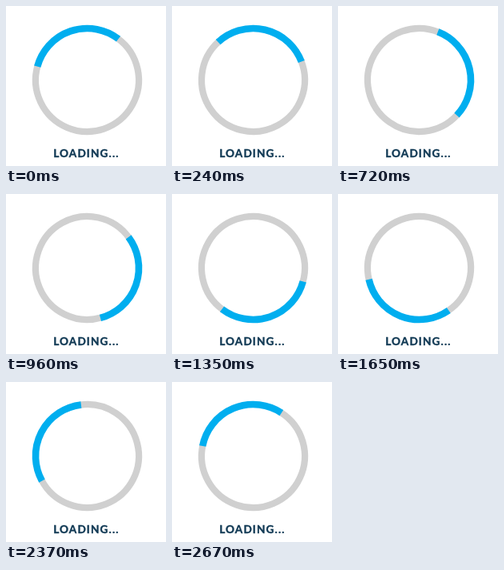
An HTML page that plays this animation: 200x200 px, repeating every 2700 ms.

```html
<!DOCTYPE html>
<html lang="en">
<head>
<meta charset="utf-8">
<title>Loading</title>
<style>
  html, body { margin: 0; width: 100%; height: 100%; overflow: hidden; background: #fff; }
  svg { display: block; width: 100vw; height: 100vh; }
  text {
    font: 700 13.6px Lato, "Open Sans", sans-serif;
    letter-spacing: 1.12px;
    fill: #123a55;
    stroke: #123a55;
    stroke-width: .4px;
  }
</style>
</head>
<body>
<svg viewBox="0 0 200 200">
  <g fill="none">
    <path id="track" stroke="#d0d0d0" stroke-width="8.2"/>
    <path id="arc" stroke="#00aeef" stroke-width="8.6"/>
  </g>
  <text x="59.2" y="189">LOADING...</text>
</svg>
<script>
  const LOOP = 2700, STEP = 30;
  const CX = 101.5, CY = 92.5, R = 64.5;
  const START = -74.8, SWEEP = 112;
  const track = document.getElementById('track');
  const arc = document.getElementById('arc');

  // Degrees run clockwise from the top.
  function point(deg) {
    const a = deg * Math.PI / 180;
    return `${(CX + R * Math.sin(a)).toFixed(3)} ${(CY - R * Math.cos(a)).toFixed(3)}`;
  }

  function arcPath(from, to) {
    const large = to - from > 180 ? 1 : 0;
    return `M${point(from)}A${R} ${R} 0 ${large} 1 ${point(to)}`;
  }

  function draw(ms) {
    const t = Math.floor((ms % LOOP) / STEP) * STEP;
    const from = START + 360 * t / LOOP;
    const to = from + SWEEP;
    arc.setAttribute('d', arcPath(from, to));
    // The track runs slightly under both ends of the arc.
    track.setAttribute('d', arcPath(to - 1, from + 361));
  }

  let origin = null;
  function tick(now) {
    if (origin === null) origin = now;
    draw(now - origin);
    requestAnimationFrame(tick);
  }
  draw(0);
  requestAnimationFrame(tick);
</script>
</body>
</html>
```
